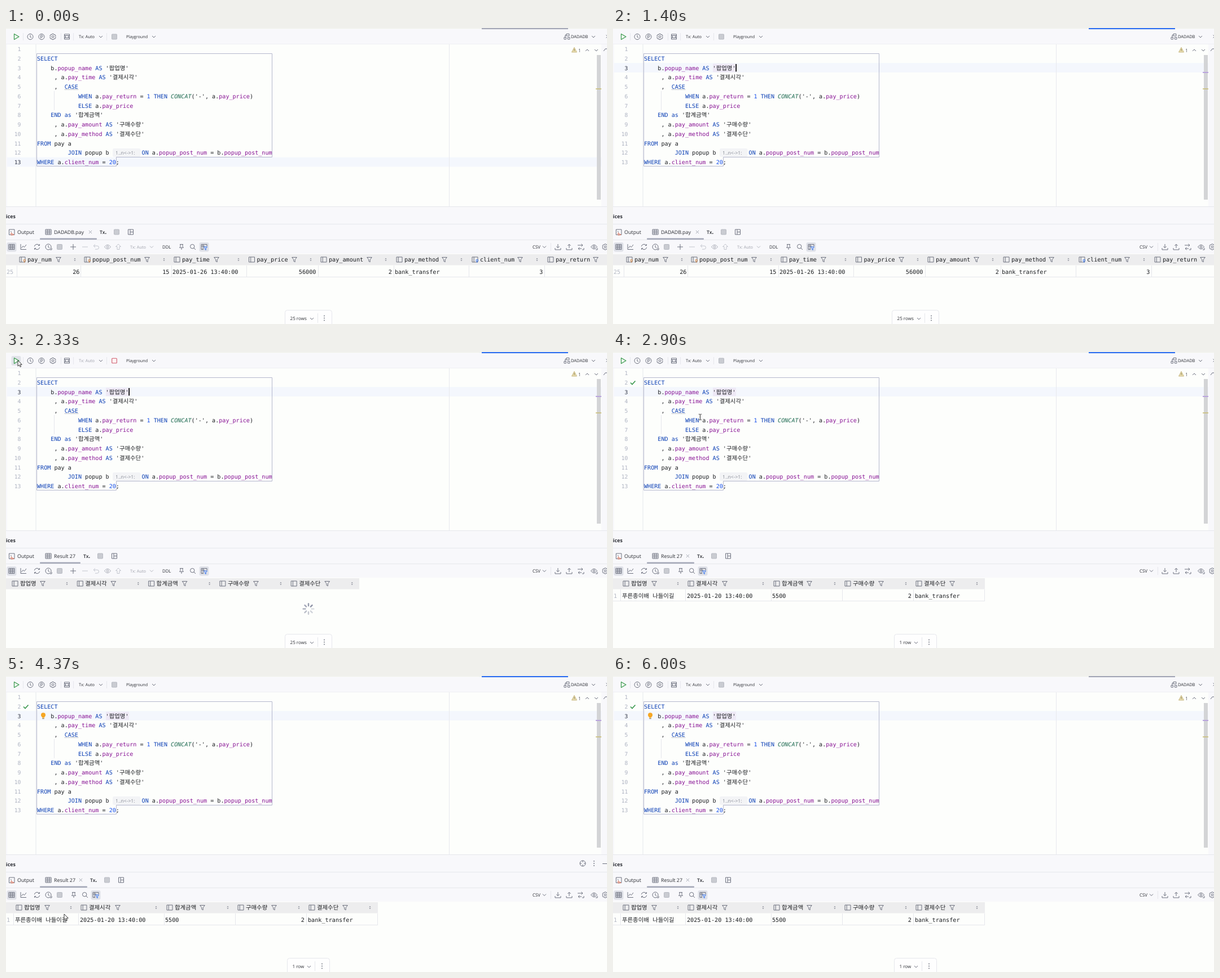
An HTML page that plays this animation: 1065 by 526 pixels, repeating every 6030 ms.

```html
<!DOCTYPE html>
<html lang="ko">
<head>
<meta charset="utf-8">
<title>SQL console</title>
<style>
html, body { margin: 0; width: 100%; height: 100%; overflow: hidden; background: #fdfefc; }
svg { display: block; width: 1065px; height: 526px; }
text { text-rendering: geometricPrecision; white-space: pre; }
.ui { font-family: "Open Sans", "Noto Sans", sans-serif; }
.mono { font-family: "DejaVu Sans Mono", "Noto Sans Mono", monospace; }
.ko { font-family: "Noto Sans CJK KR", "Noto Sans CJK", sans-serif; font-size: 10.4px; }
</style>
</head>
<body>
<svg id="stage" viewBox="0 0 1065 526"></svg>
<script>
const INK = '#2b2d33', ICON = '#6c707e', DIM = '#c3c6ce', LINE = '#e6e7ec', PANEL = '#f8f8fb';
const BLUE = '#3574f0', KEY = '#0b3fb5', FIELD = '#871094';

// ---------- drawing helpers ----------
const rect = (x, y, w, h, fill, more = '') =>
  `<rect x="${x}" y="${y}" width="${w}" height="${h}" fill="${fill}" ${more}/>`;
const stroke = (d, color, w = 1, more = '') =>
  `<path d="${d}" fill="none" stroke="${color}" stroke-width="${w}" ${more}/>`;
const label = (x, y, s, size = 7.5, fill = INK, more = '') =>
  `<text class="ui" x="${x}" y="${y}" font-size="${size}" fill="${fill}" ${more}>${s}</text>`;
const group = (id, body) => `<g id="${id}" visibility="hidden">${body}</g>`;
const vline = (x, y1, y2, color = LINE) => rect(x, y1, 1, y2 - y1, color);
const esc = s => s.replace(/&/g, '&amp;').replace(/</g, '&lt;').replace(/>/g, '&gt;');

const circle = r => `M${-r} 0a${r} ${r} 0 1 0 ${2 * r} 0a${r} ${r} 0 1 0 ${-2 * r} 0`;
const SHAPES = {
  clock: circle(5) + 'M0-3V.5L2.2 1.6',
  param: circle(5) + 'M-1.3 3V-2.7H.6a1.6 1.6 0 0 1 0 3.3H-1.3',
  gear: circle(1.8) + 'M-1.4-5H1.4L2-3.4L4-3.7L5.2-1.3L4 0L5.2 1.3L4 3.7L2 3.4L1.4 5H-1.4L-2 3.4L-4 3.7L-5.2 1.3L-4 0L-5.2-1.3L-4-3.7L-2-3.4Z',
  browse: 'M-4.5-4.5H4.5V4.5H-4.5ZM-4.5 2H4.5M-4.5-2H4.5M-2.5-2V2M2.5-2V2',
  down: 'M-3-1.5L0 1.5L3-1.5',
  up: 'M-3 1.5L0-1.5L3 1.5',
  table: 'M-5-4.5H5V4.5H-5ZM-5-1.5H5M-5 1.5H5M-1.7-4.5V4.5M1.7-4.5V4.5',
  chart: 'M-5-5V4.5H5M-3.5 2L-1-1.5L1.5.5L5-4',
  refresh: 'M-4.7-.8A4.8 4.8 0 0 1 4-2.6M4.7.8A4.8 4.8 0 0 1-4 2.6M4.4-5V-2.4H1.8M-4.4 5V2.4H-1.8',
  plus: 'M-5 0H5M0-5V5',
  minus: 'M-5 0H5',
  undo: 'M-2-4.5L-4.8-1.8L-2 1M-4.8-1.8H1.5a3 3 0 0 1 0 6H-2',
  eye: 'M-5.5 0Q0-7.5 5.5 0Q0 7.5-5.5 0' + circle(1.7),
  send: 'M0-5L4.5-.5H2V4.5H-2V-.5H-4.5Z',
  pin: 'M-3-4.5H3M-2-4.5V-.5L-3.5 1.3H3.5L2-.5V-4.5M0 1.3V5',
  search: 'M-4.5-.8a3.7 3.7 0 1 0 7.4 0a3.7 3.7 0 1 0-7.4 0M2 2L5 5',
  funnel: 'M-4.3-4H4.3L1.2.2V4.2L-1.2 3V.2Z',
  column: 'M-5-4.5H5V4.5H-5ZM-1.8-4.5V4.5',
  sort: 'M-1.6-1L0-2.6L1.6-1ZM-1.6 1L0 2.6L1.6 1Z',
  layout: 'M-4.5-4.5H4.5V4.5H-4.5ZM-1-4.5V4.5M-1 0H4.5',
  load: 'M0-5V1.5M-2.7-1L0 1.7L2.7-1M-5 2V5H5V2',
  save: 'M0 2V-4.7M-2.7-2L0-4.7L2.7-2M-5 2V5H5V2',
  swap: 'M-5-3H4M1.5-5.3L4-3L1.5-.7M2 3H-4M-1.5.7L-4 3L-1.5 5.3',
  cross: 'M-2.6-2.6L2.6 2.6M2.6-2.6L-2.6 2.6',
  target: circle(5) + 'M0-5V-2M0 5V2M-5 0H-2M5 0H2',
  schema: 'M-1-5H4V-1.5H-1ZM-5 1H-1.5V4.5H-5ZM1.5 1H5V4.5H1.5ZM-3 1V-3H-1'
};
const icon = (name, x, y, color = ICON, w = 1) =>
  stroke(SHAPES[name], color, w, `transform="translate(${x} ${y})"`);
const icons = (y, list) => list.map(([n, x, c]) => icon(n, x, y, c)).join('');
const stop = (x, y, s = 9) => rect(x - s / 2, y - s / 2, s, s, '#c9cbd1', 'stroke="#b7bac2" rx="1"');
const dots = (x, y) => [-4, 0, 4].map(d => `<circle cx="${x}" cy="${y + d}" r=".9" fill="${ICON}"/>`).join('');

// ---------- monospaced text with wide Hangul ----------
const WORDS = new Set('SELECT AS CASE WHEN THEN ELSE END as FROM JOIN ON WHERE'.split(' '));
const HAN = 9.6;
const width = (s, cw) => [...s].reduce((w, c) => w + (c >= '가' ? HAN : cw), 0);

function mono(x, y, s, { cw = 6.13, size = 10.18, fill = '#1c1e22', sql = false, end = false } = {}) {
  if (end) x -= width(s, cw);
  let out = '';
  for (const part of s.match(/[가-힣]+|[A-Za-z_]+|\d+| +|[^가-힣A-Za-z_\d ]+/g)) {
    const ko = part[0] >= '가';
    let color = fill, style = '';
    if (sql) {
      if (WORDS.has(part)) color = KEY;
      else if (part === 'CONCAT') { color = '#1f6b52'; style = 'font-style="italic"'; }
      else if (part.includes('_')) color = FIELD;
      else if (/^\d/.test(part)) color = '#1750eb';
    }
    if (part.trim()) out += `<text class="${ko ? 'ko' : 'mono'}" x="${x.toFixed(2)}" y="${y}" font-size="${size}" fill="${color}" ${style}>${esc(part)}</text>`;
    x += width(part, cw);
  }
  return out;
}

// ---------- editor ----------
const baseline = n => 57.8 + 16.75 * (n - 2);
const SQL = [
  '', 'SELECT',
  "    b.popup_name AS '팝업명'",
  "     , a.pay_time AS '결제시각'",
  '     ,  CASE',
  "            WHEN a.pay_return = 1 THEN CONCAT('-', a.pay_price)",
  '            ELSE a.pay_price',
  "    END as '합계금액'",
  "     , a.pay_amount AS '구매수량'",
  "     , a.pay_method AS '결제수단'",
  'FROM pay a',
  '         JOIN popup b',
  'WHERE a.client_num = 20;'
];
const codeStyle = { cw: 6.08, size: 10.1, sql: true };
const lineNo = (n, fill) => mono(26.5, baseline(n), String(n), { cw: 5.9, size: 9.8, fill, end: true });
const band = n => rect(2, baseline(n) - 12.3, 1053, 16.7, '#f4f7fd');

const frameBg =
  rect(0, 0, 1065, 526, '#fdfefc') + rect(0, 0, 1065, 28, PANEL) + rect(0, 28, 2, 289, PANEL) +
  rect(1055, 28, 10, 289, PANEL) + rect(0, 317, 1065, 84, PANEL) + rect(0, 0, 1065, 1, '#eef0e6') +
  rect(0, 28, 1065, 1, '#f0f0f4') + rect(0, 317, 1065, 1, LINE) + rect(0, 348, 1065, 1, LINE) +
  rect(0, 376, 1065, 1, LINE);

const editor =
  vline(52.5, 29, 317) + vline(785, 29, 317, '#e8e9ee') + vline(85, 112, 146) +
  SQL.map((s, i) => lineNo(i + 1, '#aeb3c2') + (s ? mono(55, baseline(i + 1), s, codeStyle) : '')).join('') +
  mono(240.6, baseline(12), 'ON a.popup_post_num = b.popup_post_num', codeStyle) +
  rect(189, 214, 49.5, 15, '#f3f4f6', 'rx="3"') +
  label(194, 225, '1..n&lt;-&gt;1:', 8.6, '#868a94') +
  stroke('M104 109.5H128', '#9aa0ae', 1, 'stroke-dasharray="1.5 1"') +
  stroke('M54.5 45.5H471.5V229.5H195.5V245.5H54.5Z', '#b4b7cd') +
  rect(1047, 48, 7, 257, '#d3d4d6') + rect(1045, 107.5, 10, 1.5, '#c9bd72') +
  `<path d="M1007 34.5L1011.5 43H1002.5Z" fill="#e8dcae" stroke="#c8b983"/>` + rect(1006.6, 37.5, 1, 3, '#7d734a') +
  label(1014, 43, '1', 8.5, '#5a5d66') + icon('up', 1030, 39.5) + icon('down', 1046, 39.5) +
  stroke('M1059 41L1062 37H1065', ICON);

const topBar =
  icons(15.5, [['clock', 43], ['param', 63], ['gear', 83], ['browse', 108], ['down', 168], ['down', 262],
    ['schema', 994], ['down', 1041]]) +
  vline(30, 9, 22) + vline(97, 9, 22) + vline(119, 9, 22) + vline(178, 9, 22) +
  label(213, 18.3, 'Playground', 7.2) + label(1001, 18.4, 'DADADB', 7.5) + stroke('M1063.5 12.5L1066 15L1063.5 17.5', ICON);

// ---------- results panel ----------
const tabs = (name, end, tx, closable) =>
  icon('table', 75, 362.5) + label(85, 366.2, name, 8.9) + (closable ? icon('cross', end - 11.5, 362.5, '#a1a5b0') : '') +
  rect(60, 373.5, end - 60, 2.5, '#a4a8b7', 'rx="1"') +
  label(tx - 6, 365.5, 'Tx', 8.6, INK, 'font-weight="600"') + rect(tx + 4, 364.5, 1.5, 1.5, INK) +
  stop(tx + 24, 362.5) + icon('layout', tx + 49, 362.5);

const chosen = x => rect(x - 8.5, 381, 17, 16.5, '#dfe1e8', 'rx="3"');
const filterPane = x => chosen(x) + stroke('M-5-4.5H5V-1M-5-4.5V4.5H-1M-5-1.5H1M-1.8-4.5V4.5', ICON, 1, `transform="translate(${x} 389)"`) +
  stroke('M0 0H6L3.7 2.8V5.5L2.3 4.7V2.8Z', BLUE, 1, `transform="translate(${x - .5} 389)"`);

const panel =
  label(0, 338, 'ices', 8.9, INK, 'font-weight="700"') +
  stroke('M5.5 358V367.5H15V358ZM8 361L10 363', ICON) + stroke('M9 368V364L14 367.5Z', '#d9694f') +
  label(20, 366.4, 'Output', 9) +
  chosen(10) + icons(389, [['table', 10], ['chart', 31], ['refresh', 55], ['clock', 75],
    ['down', 954], ['load', 978], ['save', 998], ['swap', 1018], ['eye', 1042], ['gear', 1062]]) +
  stop(95, 389) + label(933, 392, 'CSV', 7.9) + vline(965, 382, 396) +
  stroke('M78 394H81V391M1021 394H1024V391M1045 394H1048V391', ICON);

const fullTools =
  icons(389, [['plus', 119], ['minus', 140, DIM], ['undo', 160, DIM], ['eye', 180, '#a9acb6'], ['send', 199, DIM],
    ['down', 258, '#b4b7c0'], ['pin', 311], ['search', 331]]) +
  label(220, 392, 'Tx: Auto', 7.4, '#a0a3ad') + label(277, 392, 'DDL', 7.8) + filterPane(351);
const shortTools = icons(389, [['pin', 120], ['search', 140]]) + filterPane(159);

function header(end, cols) {
  return rect(0, 402, end, 19.5, '#ededee') + cols.map(([name, x, funnel, sort, key]) => {
    const mark = key ? stroke('M0 1.5a1.7 1.7 0 1 0 3.4 0a1.7 1.7 0 1 0-3.4 0M1.7 3V5.5', key, 1, `transform="translate(${x + 2} 411.5)"`) : '';
    return icon('column', x, 411.5) + mark + mono(x + 9, 415.2, name) + icon('funnel', funnel, 411.5) +
      (sort ? `<path d="${SHAPES.sort}" fill="${ICON}" transform="translate(${sort} 411.5)"/>` : '');
  }).join('');
}
const row = (end, lines, cells) =>
  rect(0, 442, end, 1, LINE) + lines.map(x => vline(x, 422, 442)).join('') +
  cells.map(([x, s, right, fill]) => mono(x, 437, s, { end: right, fill: fill || '#1c1e22' })).join('');

const counter = (x, w, s, chevron, sep, dot) =>
  rect(x + .5, 501.5, w, 30, '#fefefe', `rx="4" stroke="${LINE}"`) + label(x + 9.5, 518.8, s, 8.1) +
  icon('down', chevron, 516.5) + vline(sep, 507, 524) + dots(dot, 515.5);

const GOLD = '#d98a45';
const payGrid =
  header(1065, [['pay_num', 29, 93, 122, GOLD], ['popup_post_num', 144, 250, 280, GOLD], ['pay_time', 303, 373, 412],
    ['pay_price', 435.5, 511, 540], ['pay_amount', 563, 644, 673], ['pay_method', 697, 777, 807],
    ['client_num', 831, 911, 941, BLUE], ['pay_return', 965, 1045, 0]]) +
  row(1065, [19, 132, 293, 426, 553, 687, 820, 954], [[1, '25', 0, '#b4b8c4'], [130.5, '26', 1], [289.5, '15', 1],
    [295, '2025-01-26 13:40:00'], [549.5, '56000', 1], [684, '2', 1], [689, 'bank_transfer'], [951.5, '3', 1]]);

const NAMES = ['팝업명', '결제시각', '합계금액', '구매수량', '결제수단'];
const loadGrid = header(626, NAMES.map((n, i) => [n, i ? 5 + 126.3 * i : 16, i ? 64 + 126.3 * i : 65, 108 + 126.3 * i]));
const SHOWN = [[23, 73, 115], [138, 198, 266], [290, 348, 393], [416, 475, 519], [542, 601, 645]];
const doneGrid = header(659, NAMES.map((n, i) => [n, ...SHOWN[i]])) +
  row(659, [13, 128, 280, 406, 532, 658], [[1, '1', 0, '#b4b8c4'], [16, '푸른종이배 나들이길'],
    [131, '2025-01-20 13:40:00'], [282, '5500'], [529, '2', 1], [535, 'bank_transfer']]);

const spokes = Array.from({ length: 8 }, (_, i) =>
  `<path class="spoke" d="M0-5.5V-9.3" stroke="#8d92a6" stroke-width="2.4" stroke-linecap="round" transform="translate(536 456.5) rotate(${i * 45})"/>`).join('');

const bulb = `<circle cx="66" cy="69.3" r="4" fill="#f5a623"/>` + rect(64, 72.5, 4, 1.8, '#f5a623') + rect(64.2, 75, 3.6, 1.2, '#8b7a55');
const runMark = color => `<path d="M14.5 10.5L23 15.5L14.5 20.5Z" fill="#eef7ef" stroke="${color}" stroke-width="1.2" stroke-linejoin="round"/>`;

stage.innerHTML = frameBg +
  group('line13', band(13)) +
  group('line3', band(3) + rect(177, 63.5, 41, 15, '#eee9f6')) +
  editor +
  group('num13', lineNo(13, '#4b4f5c')) +
  group('num3', lineNo(3, '#4b4f5c') + rect(1045, 78, 10, 2, '#b9a4dd')) +
  group('caret', rect(217.3, 64, 1.7, 13.5, '#000')) +
  group('tick', stroke('M31 54.5L34 57.5L39.5 51.5', '#3d9a50', 1.7)) +
  group('bulb', bulb) +
  group('blueBar', rect(843, 0, 153, 2.2, BLUE)) + group('grayBar', rect(843, 0, 153, 2.2, '#a6a9b8')) +
  topBar +
  group('hover', rect(9.5, 7, 17, 17, '#e1e3e9', 'rx="3"')) + runMark('#3d9a50') +
  group('idle', stop(192, 15.5) + label(129, 18.4, 'Tx: Auto', 7.4)) +
  group('busy', rect(187.7, 11.2, 8.6, 8.6, '#fdf3f4', 'rx="1" stroke="#cf5b6c" stroke-width="1.1"') + label(129, 18.4, 'Tx: Auto', 7.4, '#a0a3ad')) +
  panel +
  group('paneIcons', icon('target', 1022, 333) + dots(1042, 333) + stroke('M1057 333.5H1065', ICON)) +
  group('full', fullTools + counter(494, 83, '25 rows', 542, 552, 564)) +
  group('pay', tabs('DADADB.pay', 161, 172, true) + payGrid) +
  group('load', tabs('Result 27', 132, 143, false) + loadGrid + spokes) +
  group('done', tabs('Result 27', 144, 155, true) + shortTools + doneGrid + counter(498, 75, '1 row', 537, 547, 560)) +
  group('arrow', '<path d="M0 0V10.2L2.4 8L4.1 11.6L5.7 10.9L4.1 7.3H7.3Z" fill="#fff" stroke="#222" stroke-width=".9"/>') +
  group('beam', stroke('M-2.5-5H-.8L0-4.3L.8-5H2.5M0-4.3V4.3M-2.5 5H-.8L0 4.3L.8 5H2.5', '#222'));

// ---------- timeline ----------
const LOOP = 6030;
const CLICK = 1200, RUN = 2230, RESULT = 2650, BULB = 3000, BLUR = 5760;
const PATHS = [
  [[200, 500, 530], [450, 420, 300], [650, 289, 54], [900, 289, 54], [1150, 222, 72], [1290, 219, 71]],
  [[1650, 215, 70], [2100, 24, 18], [2250, 21, 15], [2700, 21, 15], [3000, 200, 150], [3300, 330, 340],
    [3530, 321, 266], [3750, 280, 330], [4050, 150, 505], [4340, 103, 423], [4480, 103, 423], [4700, 300, 468], [4950, 1075, 462]]
];
const ease = u => u * u * (3 - 2 * u);

function mouseAt(t) {
  const p = PATHS.find(k => t >= k[0][0] && t < k[k.length - 1][0]);
  if (!p) return null;
  const i = p.findIndex(k => t < k[0]);
  const [t0, x0, y0] = p[i - 1], [t1, x1, y1] = p[i];
  const u = ease((t - t0) / (t1 - t0));
  return [x0 + (x1 - x0) * u, y0 + (y1 - y0) * u];
}

const byId = id => document.getElementById(id);
const show = (id, on) => byId(id).setAttribute('visibility', on ? 'visible' : 'hidden');
const spokeEls = [...document.querySelectorAll('.spoke')];

function draw(t) {
  const edited = t >= CLICK, loading = t >= RUN && t < RESULT, done = t >= RESULT;
  const active = edited && t < BLUR;
  show('line13', !edited); show('num13', !edited);
  show('line3', edited); show('num3', edited);
  show('caret', active && (t - CLICK) % 1100 < 550);
  show('blueBar', active); show('grayBar', !active);
  show('tick', done); show('bulb', t >= BULB);
  show('idle', !loading); show('busy', loading);
  show('full', !done); show('pay', t < RUN); show('load', loading); show('done', done);
  show('paneIcons', (t >= 220 && t < 460) || (t >= 3280 && t < 4940));

  const step = Math.floor(t / 125);
  spokeEls.forEach((el, i) => el.setAttribute('opacity', 0.3 + 0.7 * (((i - step) % 8 + 8) % 8) / 7));

  const m = mouseAt(t);
  const beam = m && m[0] > 53 && m[0] < 1047 && m[1] > 28 && m[1] < 317;
  show('beam', beam); show('arrow', m && !beam);
  show('hover', m && m[0] < 27 && m[1] < 24);
  if (m) byId(beam ? 'beam' : 'arrow').setAttribute('transform', `translate(${m[0].toFixed(1)} ${m[1].toFixed(1)})`);
}

const start = performance.now();
function tick(now) {
  draw(Math.max(0, now - start) % LOOP);
  requestAnimationFrame(tick);
}
draw(0);
requestAnimationFrame(tick);
</script>
</body>
</html>
```
